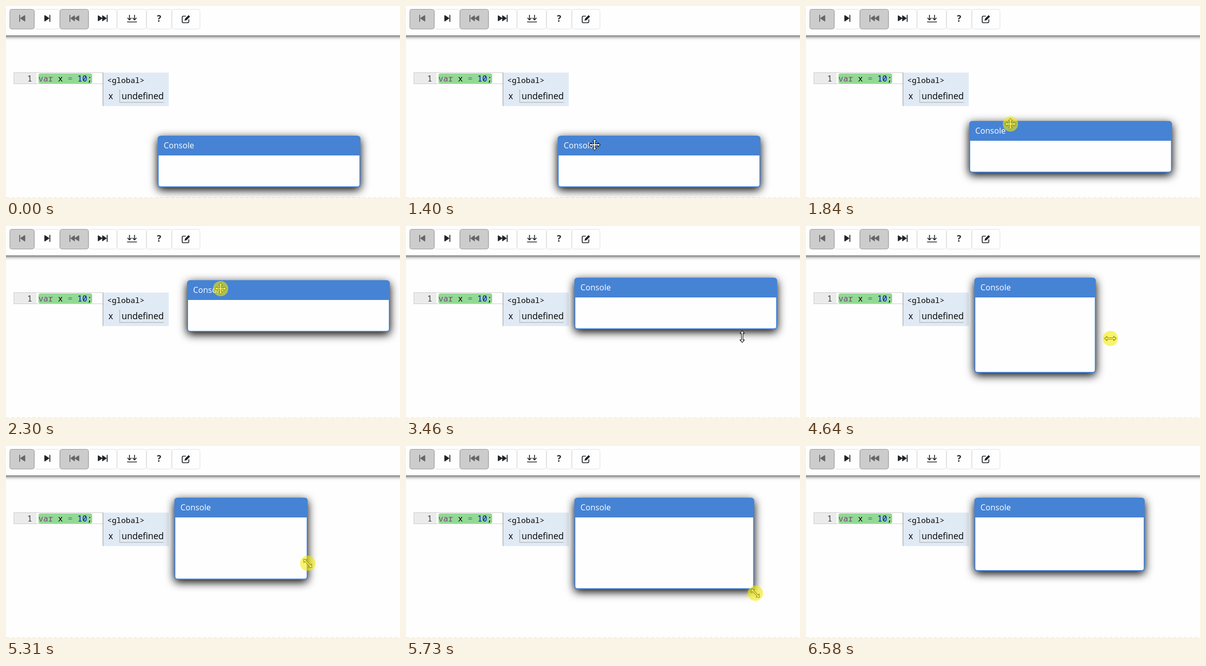
An HTML page that plays this animation: 777x379 px, repeating every 6.94 s.

```html
<!DOCTYPE html>
<html lang="en">
<head>
<meta charset="utf-8">
<title>Console window</title>
<style>
  html, body { margin: 0; width: 100%; height: 100%; overflow: hidden; background: #fefefe; }
  svg { display: block; width: 777px; height: 379px; }
  text { white-space: pre; }
  .mono { font-family: "Noto Sans Mono", "DejaVu Sans Mono", monospace; font-size: 16px; }
  .sans { font-family: "Open Sans", "Noto Sans", sans-serif; font-size: 17.4px; }
  .title { font-family: "Open Sans", "Noto Sans", sans-serif; font-size: 16px; fill: #fff; }
  .btn { fill: #fefefe; stroke: #e2e2e2; }
  .btn.off { fill: #ccc; stroke: #999; }
  .line { fill: none; stroke: #212529; stroke-width: 1.7; stroke-linecap: round; stroke-linejoin: round; }
</style>
</head>
<body>
<svg viewBox="0 0 777 379">
  <defs>
    <filter id="soft" filterUnits="userSpaceOnUse" x="0" y="0" width="777" height="379">
      <feGaussianBlur stdDeviation="9"/>
    </filter>
    <filter id="barSoft" filterUnits="userSpaceOnUse" x="-30" y="-30" width="840" height="120">
      <feGaussianBlur stdDeviation="4"/>
    </filter>
    <path id="skip" d="M0 -6.2V6.2M10 -5.2L2.2 0L10 5.2Z" stroke-width="1.8" stroke-linecap="round" stroke-linejoin="round"/>
    <path id="skip2" d="M0 -6.2V6.2M9 -4.8L2.2 0L9 4.8ZM17.5 -4.8L10.7 0L17.5 4.8Z" stroke-width="1.8" stroke-linecap="round" stroke-linejoin="round"/>
    <path id="double" d="M0 -11.5L4.5 -6.5H1.5V6.5H4.5L0 11.5L-4.5 6.5H-1.5V-6.5H-4.5Z"/>
  </defs>

  <rect width="777" height="379" fill="#fefefe"/>
  <path d="M0 378.5H777" stroke="#dedede" stroke-dasharray="6 4.5"/>

  <rect x="-20" y="-20" width="817" height="79" fill="#000" opacity=".9" filter="url(#barSoft)"/>
  <rect width="777" height="58" fill="#fefefe"/>
  <g id="buttons"></g>
  <g fill="#666" stroke="#666">
    <use href="#skip" x="27" y="24.3"/>
    <use href="#skip2" x="126" y="24.3"/>
  </g>
  <g fill="#212529" stroke="#212529">
    <use href="#skip" transform="translate(86.5 24.3) scale(-1 1)"/>
    <use href="#skip2" transform="translate(199.5 24.3) scale(-1 1)"/>
  </g>
  <path class="line" d="M243.5 18V27M240 24L243.5 27.5L247 24M253.5 18V27M250 24L253.5 27.5L257 24M239.5 31.5H257.5"/>
  <text class="sans" x="302" y="31" text-anchor="middle" font-weight="700" fill="#212529">?</text>
  <path class="line" d="M354 20H350Q347.5 20 347.5 22.5V30.5Q347.5 33 350 33H358Q360.5 33 360.5 30.5V27"/>
  <path d="M352 29L353 25L360 18L363 21L356 28Z" fill="#212529"/>

  <rect x="15.5" y="131.5" width="176" height="22" fill="#fefefe" stroke="#ccc"/>
  <rect x="16" y="132" width="44" height="21" fill="#ebebeb"/>
  <rect x="64" y="133" width="106" height="20" rx="4" fill="#92d994"/>
  <text class="mono" x="42" y="149" fill="#333">1</text>
  <text class="mono" x="64" y="149"><tspan fill="#7f3f7f">var</tspan> x <tspan fill="#687687">=</tspan> <tspan fill="#0000cd">10</tspan>;</text>

  <rect x="191" y="131.5" width="130" height="66" fill="#e0eaf5"/>
  <path d="M191.3 131.5V197.5" stroke="#aaa" stroke-width="1.3"/>
  <path d="M224.3 165V190.3H311" fill="none" stroke="#b4b4b4" stroke-width="1.3"/>
  <text class="mono" x="199.5" y="152" style="font-size:15.3px">&lt;global&gt;</text>
  <text class="sans" x="202" y="184">x</text>
  <text class="sans" x="228" y="184">undefined</text>

  <rect id="shade" rx="6" filter="url(#soft)"/>
  <g id="win">
    <rect id="frame" rx="6" fill="#4683d4"/>
    <path id="pane" fill="#fefefe"/>
    <text class="title" x="12" y="25">Console</text>
  </g>

  <g id="mouse">
    <g id="shape" fill="#fff" stroke="#111" stroke-width="1.1" stroke-linejoin="round"></g>
    <circle id="press" r="15" fill="#f4ea00" opacity=".58"/>
  </g>
</svg>
<script>
const LOOP = 6940;
const LEAD = 40; // the window trails the pointer by this much
const $ = id => document.getElementById(id);
const set = (el, attrs) => { for (const k in attrs) el.setAttribute(k, attrs[k]); };
const mix = (a, b, u) => a + (b - a) * u;
const ease = (t, from, to) => {
  const u = Math.min(1, Math.max(0, (t - from) / (to - from)));
  return u * u * (3 - 2 * u);
};

const edges = [7, 56, 106, 163, 219, 277, 327, 383];
$('buttons').innerHTML = edges.slice(0, -1).map((x, i) =>
  `<rect class="btn${i === 0 || i === 2 ? ' off' : ''}" x="${x + .5}" y="6.5" width="${edges[i + 1] - x - 1}" height="39" rx="4"/>`).join('');

// The window is dragged up, then sized by its bottom, its right side and its corner.
function box(t) {
  const go = (from, to, by) => by * ease(t, from, to);
  const lift = ease(t, 1660, 2300);
  const x = 299 + 58 * lift + 20 * Math.sin(Math.PI * lift) + go(2300, 2420, -25);
  const y = 256 - 149 * lift + go(2300, 2420, -5);
  const w = 400 + go(4250, 4550, -192) + go(4550, 4800, 105)
    + go(5250, 5310, -50) + go(5450, 5760, 94) + go(5760, 6000, -21);
  const h = 102 + go(3460, 3700, 95) + go(3870, 3990, -9)
    + go(5260, 5410, -98) + go(5450, 5760, 93) + go(5760, 6000, -38);
  return { x, y, w, h, right: x + w, bottom: y + h };
}

// Where the pointer goes: travel time, time held down, and the spot it holds on to.
const stops = [
  { kind: 'move', go: [170, 870], hold: [1660, 2440], at: b => [b.x + 73, b.y + 18] },
  { kind: 'ns', go: [2500, 3030], hold: [3475, 3730], at: b => [663, b.bottom + 7] },
  { kind: 'ew', go: [3870, 4080], hold: [4245, 4790], at: b => [b.right + 4, 222] },
  { kind: 'nwse', go: [4800, 4930], hold: [5250, 5980], at: b => [b.right, b.bottom + 6] },
  { kind: 'arrow', go: [5990, 6570], hold: [LOOP, LOOP], at: () => [560, 385] }
];

const double = turn => `<use href="#double" transform="rotate(${turn})"/>`;
const shapes = {
  arrow: '<path d="M0 0V16L3.7 12.5L6.2 18.2L8.8 17L6.3 11.5H11.3Z"/>',
  move: '<path d="M0 -11L4 -6.5H1.5V-1.5H6.5V-4L11 0L6.5 4V1.5H1.5V6.5H4L0 11L-4 6.5H-1.5V1.5H-6.5V4L-11 0L-6.5 -4V-1.5H-1.5V-6.5H-4Z"/>',
  ns: double(0), ew: double(90), nwse: double(-45)
};

function pointer(t) {
  const ahead = box(t + LEAD);
  let x = 540, y = 385, kind = 'arrow', down = false;
  for (const { kind: own, go: [from, to], hold: [a, b], at } of stops) {
    if (t < from) break;
    const [px, py] = at(ahead), u = ease(t, from, to);
    x = mix(x, px, u);
    y = mix(y, py, u);
    if (t > from + 20) kind = t > to - 20 ? own : 'arrow';
    down = t >= a && t < b;
  }
  return { x, y, kind, down };
}

let shown = '';
function draw(t) {
  const { x, y, w, h } = box(t), p = pointer(t);
  set($('shade'), { x, y: y + 5, width: w, height: h });
  set($('win'), { transform: `translate(${x} ${y})` });
  set($('frame'), { width: w, height: h });
  set($('pane'), { d: `M2 39H${w - 2}V${h - 6}Q${w - 2} ${h - 2} ${w - 6} ${h - 2}H6Q2 ${h - 2} 2 ${h - 6}Z` });

  if (p.kind !== shown) $('shape').innerHTML = shapes[shown = p.kind];
  set($('mouse'), {
    transform: `translate(${p.x} ${p.y})`,
    visibility: t >= 170 && t < 6575 ? 'visible' : 'hidden'
  });
  set($('press'), { display: p.down ? 'inline' : 'none' });
}

const start = performance.now();
function tick() {
  draw((performance.now() - start) % LOOP);
  requestAnimationFrame(tick);
}
draw(0);
requestAnimationFrame(tick);
</script>
</body>
</html>
```
